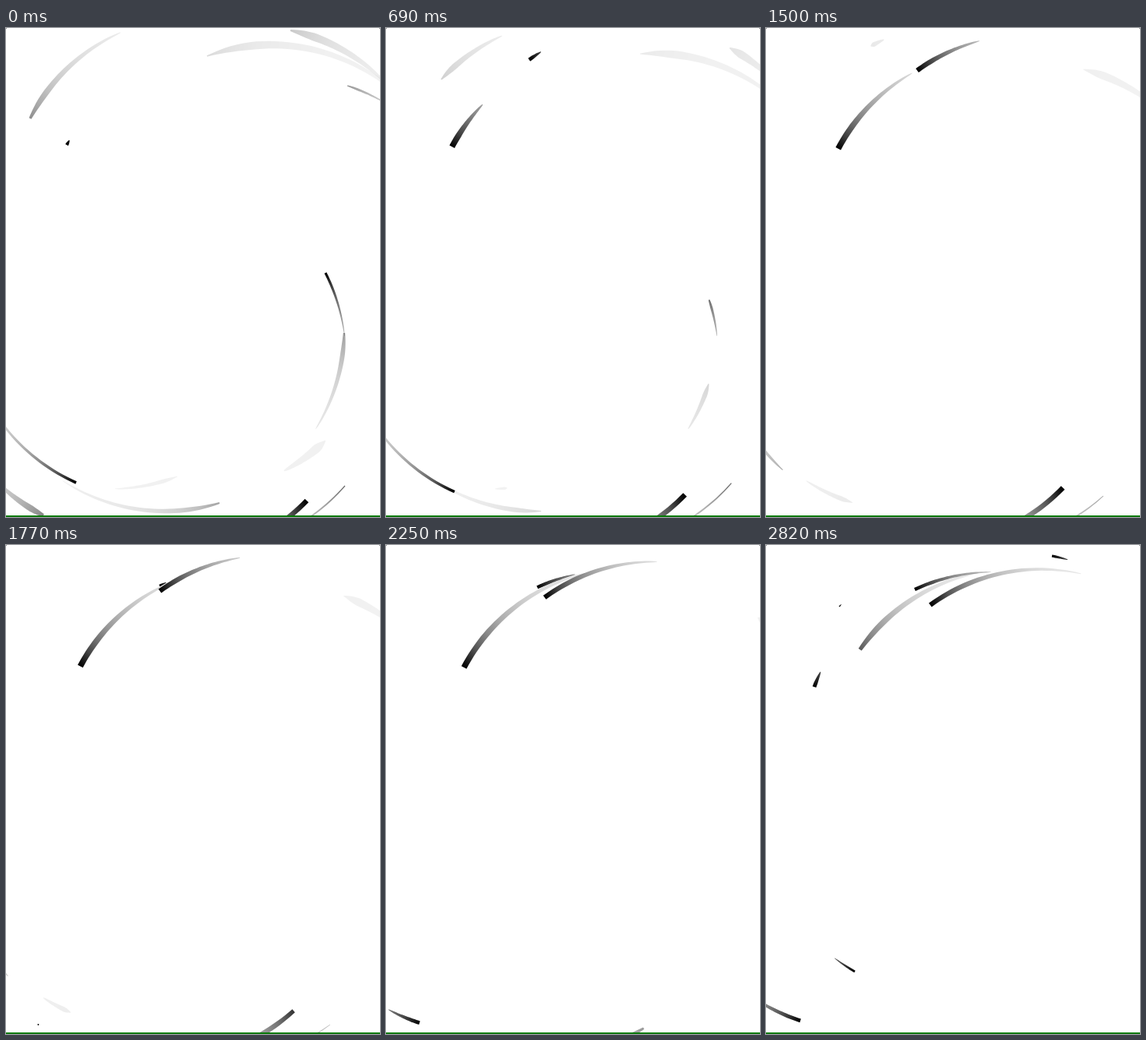
Write an HTML page with a canvas that moves like this. It is 480 px wide and 627 px high and loops after 2850 ms.

```html
<!DOCTYPE html>
<html lang="en">
<head>
<meta charset="utf-8">
<title>Ink strokes</title>
<style>
  html, body { margin: 0; width: 100%; height: 100%; overflow: hidden; background: #fff; }
  canvas { display: block; }
</style>
</head>
<body>
<canvas id="stage" width="480" height="627"></canvas>
<script>
const LOOP = 2850, STEP = 30;
const RADIUS = 240;   // every stroke is a clockwise arc
const GROW = .087;    // px per ms at the front
const WEAR = .096;    // px per ms erased from the head
const ctx = document.getElementById('stage').getContext('2d');
const strokes = [];

// Head position at time 0 and heading in degrees. Options: drift in px per second,
// born and rest in ms (growth and wear begin), span in px, worn = ink already lost in px.
function stroke(x, y, heading, width, options) {
  strokes.push({
    x, y, angle: heading * Math.PI / 180, width,
    vx: 0, vy: 0, born: -Infinity, rest: Infinity, span: 215, worn: 0, ...options
  });
}

// Upper left
stroke(31, 116, -63, 7.5, { vx: 3, vy: 6, rest: 0, span: 163, worn: 55 });
stroke(78, 150, -62, 7.5, { vx: 9.8, vy: 3.1, born: -80, rest: 2520 });
stroke(175, 29, -36, 6.2, { vx: 12.7, vy: 17, born: 480 });
stroke(207, 43.5, -25, 4.3, { vx: -5.7, vy: 4.8, born: 1660 });
stroke(62, 182, -70, 6, { born: 2580 });
stroke(94, 79, -48, 3, { born: 2775 });

// Upper right
stroke(258, 36, -20, 10, { vx: 5, vy: 16, rest: 0, span: 260, worn: 145 });
stroke(365, 3, 12, 10, { vx: 20, rest: 0, span: 140, worn: 110 });
stroke(438, 74, 18, 3, { rest: 0, span: 60, worn: 60 });
stroke(367, 14, 11, 4, { born: 2580 });

// Right arc
stroke(410, 314, 63, 3.2, { vx: -14, rest: 300, span: 85 });
stroke(434, 391, 91, 6, { vx: -14, rest: 0, span: 130, worn: 65 });
stroke(410, 529, 136, 11, { rest: 0, span: 66, worn: 300 });

// Lower right
stroke(386, 606, 134, 6.5, { vx: -3.3, vy: -11, rest: 1610 });
stroke(435, 587, 131, 2, { vx: 12, vy: -5, rest: 1200, worn: 35 });

// Bottom and lower left
stroke(90, 583, 204, 3.6, { vx: -3, vy: 17, rest: 700 });
stroke(48, 625, 207, 8, { rest: 0, span: 80, worn: 50 });
stroke(274, 609, 163, 6, { vx: -14, rest: 0, span: 210, worn: 70 });
stroke(220, 575, 159, 5, { rest: 0, span: 82, worn: 300 });
stroke(38.5, 624, 198, 4.8, { vx: 2, vy: -5, born: 1750 });
stroke(114, 547, 210, 2.8, { born: 2460 });

const inkAt = age => .05 + .95 * Math.exp(-age / 62);

// Blunt while the head is fresh, pointed once it has worn.
function profile(u, blunt) {
  return u < .25
    ? blunt + (1 - blunt) * Math.sin(u * 2 * Math.PI)
    : .1 + .9 * Math.pow(1 - (u - .25) / .75, .6);
}

function drawStroke(s, t) {
  const back = Math.max(0, WEAR * (t - s.rest));
  const front = Math.min(s.span, GROW * (t - s.born));
  const length = front - back;
  if (length <= .5) return;

  const cx = s.x + s.vx * t / 1000 - RADIUS * Math.sin(s.angle);
  const cy = s.y + s.vy * t / 1000 + RADIUS * Math.cos(s.angle);
  const onArc = (d, offset) => {
    const a = s.angle + d / RADIUS, r = RADIUS + offset;
    return [cx + r * Math.sin(a), cy - r * Math.cos(a)];
  };

  const size = s.width / 2 * Math.min(1, .4 + length / 50);
  const blunt = inkAt(back + s.worn);
  const outer = [], inner = [];
  for (let i = 0; i <= 32; i++) {
    const d = back + length * i / 32, half = size * profile(i / 32, blunt);
    outer.push(onArc(d, half));
    inner.unshift(onArc(d, -half));
  }

  const paint = ctx.createLinearGradient(...onArc(back, 0), ...onArc(front, 0));
  for (let u = 0; u <= 1; u += .125) {
    paint.addColorStop(u, `rgba(0,0,0,${inkAt(back + length * u + s.worn)})`);
  }
  ctx.fillStyle = paint;
  ctx.beginPath();
  outer.concat(inner).forEach(p => ctx.lineTo(...p));
  ctx.fill();
}

function drawEdges() {
  ctx.fillStyle = '#888';
  ctx.fillRect(0, 0, 1, 1);
  ctx.fillRect(479, 0, 1, 1);
  ctx.fillStyle = '#007a00';
  ctx.fillRect(0, 625, 480, 2);
}

let start;
function frame(now) {
  start ??= now;
  const t = Math.floor((now - start) % LOOP / STEP) * STEP;
  ctx.filter = 'none';
  ctx.fillStyle = '#fff';
  ctx.fillRect(0, 0, 480, 627);
  ctx.filter = 'blur(0.7px)';
  strokes.forEach(s => drawStroke(s, t));
  ctx.filter = 'none';
  drawEdges();
  requestAnimationFrame(frame);
}
requestAnimationFrame(frame);
</script>
</body>
</html>
```
